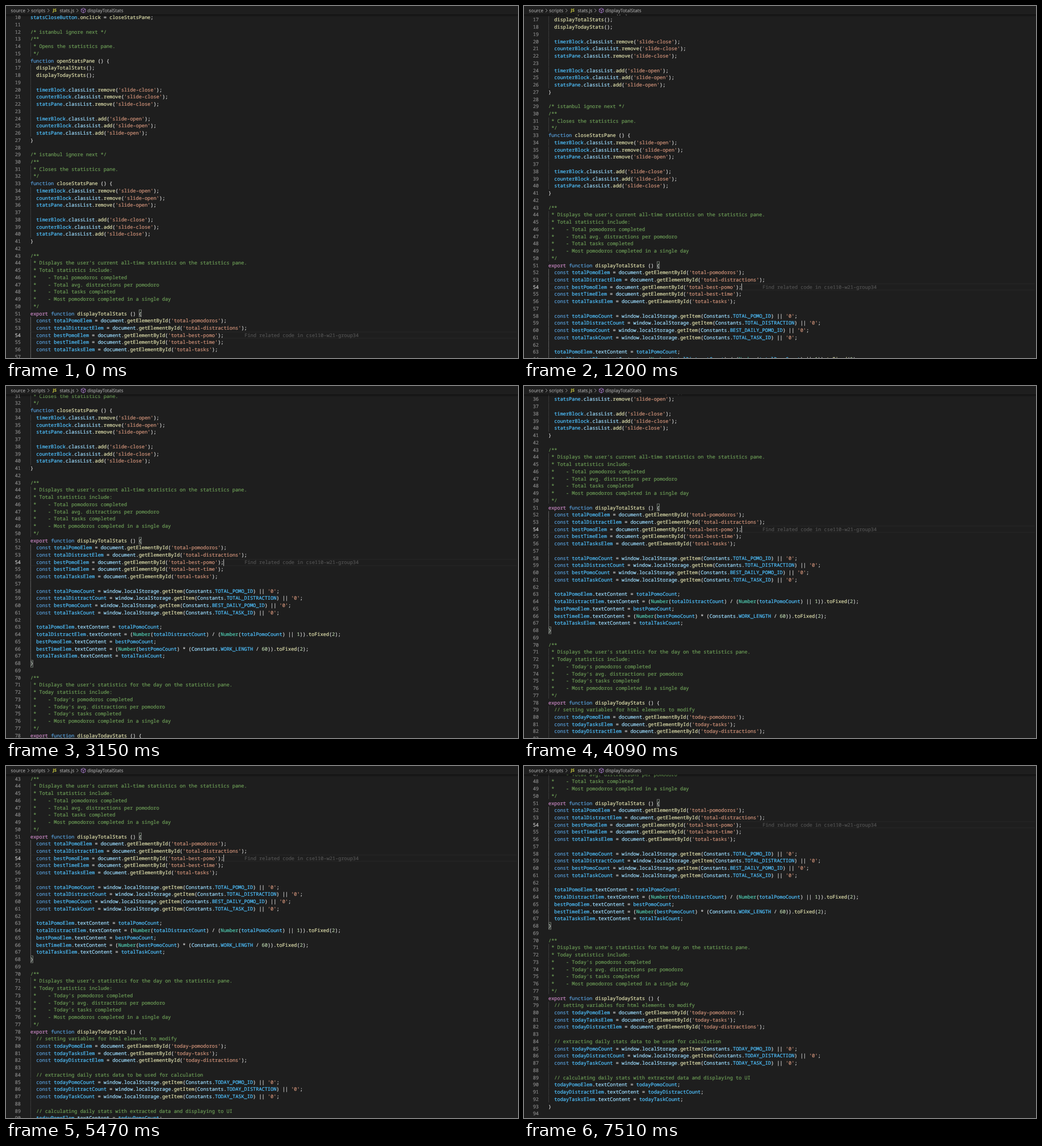
These frames come from a looping animation (902 px wide and 621 px high, 7910 ms). An HTML page:

```html
<!DOCTYPE html>
<html lang="en">
<head>
<meta charset="utf-8">
<title>stats.js</title>
<style>
  html, body { margin: 0; width: 902px; height: 621px; overflow: hidden; background: #1e1e1e; }
  body { position: relative; text-rendering: geometricPrecision; }
  #path span, #path svg, #view, #sheet, #sheet i, .row, .num, .code, .hint { position: absolute; }
  #path { font: 8.13px/15px "Open Sans", "Noto Sans", sans-serif; color: #a9a9a9; -webkit-text-stroke: .12px; }
  #path span { top: .5px; white-space: pre; }
  #path .js { font-size: 7.2px; font-weight: 700; color: #cbcb41; }
  #path svg { left: 0; top: 0; fill: none; stroke: #a9a9a9; stroke-width: .85; }
  #view { left: 0; top: 15px; width: 902px; height: 606px; overflow: hidden; }
  #view::after {
    content: ""; position: absolute; inset: 0;
    box-shadow: inset 0 4px 4px -4px #000;
  }
  #sheet {
    left: 0; top: 0; width: 902px;
    font: 8.6px/12.74px "Noto Sans Mono", monospace; color: #d4d4d4;
    -webkit-text-stroke: .22px;
  }
  .row { left: 0; width: 902px; height: 12.74px; white-space: pre; }
  .num, .code, .hint { top: .2px; }
  .num { left: 0; width: 26px; text-align: right; color: #858585; }
  .code { left: 43px; }
  .hint { left: 420.3px; color: #505050; }
  #sheet i { box-sizing: border-box; height: 12.74px; top: 0; }
  .guide { left: 43px; width: 1px; background: #3a3a3a; }
  .guide.active { background: #606060; }
  .current { left: 43px; width: 857px; border: solid #282828; border-width: 1px 0; }
  .pair { width: 5.6px; border: 1px solid #757575; background: rgba(0, 100, 0, .1); }
  #caret { left: 383px; width: 1px; background: #c4c5c3; }
  .active-num { color: #c6c6c6; }
  .comment { color: #6a9955; }
  .string { color: #ce9178; }
  .key { color: #569cd6; }
  .flow { color: #c586c0; }
  .type { color: #4ec9b0; }
  .fn { color: #dcdcaa; }
  .const { color: #4fc1ff; }
  .prop { color: #9cdcfe; }
  .digit { color: #b5cea8; }
</style>
</head>
<body>
<div id="path">
  <span style="left:8.6px">source</span>
  <span style="left:44.3px">scripts</span>
  <span class="js" style="left:82.6px">JS</span>
  <span style="left:94.4px">stats.js</span>
  <span style="left:143.2px">displayTotalStats</span>
  <svg width="220" height="15">
    <path d="M38 5l3 3-3 3M73.3 5l3 3-3 3M124.3 5l3 3-3 3"/>
    <path stroke="#b180d7" d="M136.3 3.8l3.7 1.9v4.4l-3.7 2-3.7-2V5.7zM132.6 5.7l3.7 2 3.7-2M136.3 7.7v4.4"/>
  </svg>
</div>
<div id="view"><div id="sheet"></div></div>

<script type="text/plain" id="text">
statsCloseButton.onclick = closeStatsPane;

/* istanbul ignore next */
/**
 * Opens the statistics pane.
 */
function openStatsPane () {
  displayTotalStats();
  displayTodayStats();

  timerBlock.classList.remove('slide-close');
  counterBlock.classList.remove('slide-close');
  statsPane.classList.remove('slide-close');

  timerBlock.classList.add('slide-open');
  counterBlock.classList.add('slide-open');
  statsPane.classList.add('slide-open');
}

/* istanbul ignore next */
/**
 * Closes the statistics pane.
 */
function closeStatsPane () {
  timerBlock.classList.remove('slide-open');
  counterBlock.classList.remove('slide-open');
  statsPane.classList.remove('slide-open');

  timerBlock.classList.add('slide-close');
  counterBlock.classList.add('slide-close');
  statsPane.classList.add('slide-close');
}

/**
 * Displays the user's current all-time statistics on the statistics pane.
 * Total statistics include:
 *    - Total pomodoros completed
 *    - Total avg. distractions per pomodoro
 *    - Total tasks completed
 *    - Most pomodoros completed in a single day
 */
export function displayTotalStats () {
  const totalPomoElem = document.getElementById('total-pomodoros');
  const totalDistractElem = document.getElementById('total-distractions');
  const bestPomoElem = document.getElementById('total-best-pomo');
  const bestTimeElem = document.getElementById('total-best-time');
  const totalTasksElem = document.getElementById('total-tasks');

  const totalPomoCount = window.localStorage.getItem(Constants.TOTAL_POMO_ID) || '0';
  const totalDistractCount = window.localStorage.getItem(Constants.TOTAL_DISTRACTION) || '0';
  const bestPomoCount = window.localStorage.getItem(Constants.BEST_DAILY_POMO_ID) || '0';
  const totalTaskCount = window.localStorage.getItem(Constants.TOTAL_TASK_ID) || '0';

  totalPomoElem.textContent = totalPomoCount;
  totalDistractElem.textContent = (Number(totalDistractCount) / (Number(totalPomoCount) || 1)).toFixed(2);
  bestPomoElem.textContent = bestPomoCount;
  bestTimeElem.textContent = (Number(bestPomoCount) * (Constants.WORK_LENGTH / 60)).toFixed(2);
  totalTasksElem.textContent = totalTaskCount;
}

/**
 * Displays the user's statistics for the day on the statistics pane.
 * Today statistics include:
 *    - Today's pomodoros completed
 *    - Today's avg. distractions per pomodoro
 *    - Today's tasks completed
 *    - Most pomodoros completed in a single day
 */
export function displayTodayStats () {
  // setting variables for html elements to modify
  const todayPomoElem = document.getElementById('today-pomodoros');
  const todayTasksElem = document.getElementById('today-tasks');
  const todayDistractElem = document.getElementById('today-distractions');

  // extracting daily stats data to be used for calculation
  const todayPomoCount = window.localStorage.getItem(Constants.TODAY_POMO_ID) || '0';
  const todayDistractCount = window.localStorage.getItem(Constants.TODAY_DISTRACTION) || '0';
  const todayTaskCount = window.localStorage.getItem(Constants.TODAY_TASK_ID) || '0';

  // calculating daily stats with extracted data and displaying to UI
  todayPomoElem.textContent = todayPomoCount;
  todayDistractElem.textContent = todayDistractCount;
  todayTasksElem.textContent = todayTaskCount;
}

</script>
<script>
  const FIRST = 10, CURRENT = 54, ROW = 12.74, CELL = 5.16, LEFT = 43, LOOP = 7910;
  const sheet = document.getElementById('sheet');
  const lines = document.getElementById('text').textContent.slice(1, -1).split('\n');

  const TOKEN = new RegExp([
    "(?<string>'[^']*')",
    '(?<key>\\b(?:const|function)\\b)',
    '(?<flow>\\bexport\\b)',
    '(?<type>\\bNumber\\b)',
    '(?<fn>\\b(?:onclick|closeStatsPane)\\b|\\b[a-z]\\w*(?= ?\\())',
    '(?<const>\\b[A-Z]+_[A-Z_]+|\\b(?:total|best|today|timer|counter|stats)\\w+)',
    '(?<digit>\\b\\d+)',
    '(?<prop>\\b[A-Za-z]\\w*)'
  ].join('|'), 'g');

  const wrap = (kind, text) => `<span class="${kind}">${text}</span>`;

  function highlight(line) {
    if (/^\s*(\/[*\/]|\*)/.test(line)) return wrap('comment', line);
    return line.replace(TOKEN, (text, ...rest) => {
      const groups = rest[rest.length - 1];
      return wrap(Object.keys(groups).find(k => groups[k] !== undefined), text);
    });
  }

  const indented = i => /^ /.test(lines[i] || '');
  const pairBox = col => `<i class="pair" style="left:${LEFT + col * CELL - .3}px"></i>`;

  sheet.innerHTML = lines.map((line, i) => {
    const n = FIRST + i;
    const current = n === CURRENT;
    let html = current ? '<i class="current"></i>' : '';
    if (indented(i) || (!line && indented(i - 1) && indented(i + 1))) {
      html += `<i class="guide${n > 51 && n < 68 ? ' active' : ''}"></i>`;
    }
    if (n === 51) html += pairBox(line.length - 1);
    if (n === 68) html += pairBox(0);
    html += `<span class="num${current ? ' active-num' : ''}">${n}</span>`;
    html += `<span class="code">${highlight(line)}</span>`;
    if (current) {
      html += '<span class="hint">Find related code in cse110-w21-group34</span><i id="caret"></i>';
    }
    return `<div class="row" style="top:${(i * ROW).toFixed(2)}px">${html}</div>`;
  }).join('');

  // Each leg: top of the current row at its end, and the step gaps in 10 ms.
  const legs = [
    [489.1, [12, 15, 12, 12, 15, 12, 12, 15, 15]],
    [364, [15, 12, 12, 15, 15, 12, 15, 15]],
    [246.1, [12, 15, 15, 15, 12, 15, 15, 12, 12, 15, 12, 28]],
    [191.6, [12, 15, 15, 12, 15, 15]],
    [120.6, [12, 12, 15, 15, 12, 15, 15, 12]],
    [97.1, [12, 15, 12, 12]],
    [97.1, [59, 40]]
  ];

  const steps = [{ t: 0, y: 574.1 }];
  for (const [end, gaps] of legs) {
    let { t, y } = steps[steps.length - 1];
    const dy = (end - y) / gaps.length;
    for (const gap of gaps) steps.push({ t: t += gap * 10, y: y += dy });
  }

  const caret = document.getElementById('caret');
  const viewTop = 15;
  let shown;

  function draw() {
    const now = performance.now() % LOOP;
    const step = steps.findLast(s => s.t <= now);
    if (step !== shown) {
      shown = step;
      const top = step.y - (CURRENT - FIRST) * ROW - viewTop;
      sheet.style.transform = `translateY(${top.toFixed(2)}px)`;
      const phase = step.t % 1000;
      caret.style.visibility = phase >= 10 && phase < 510 ? 'visible' : 'hidden';
    }
    requestAnimationFrame(draw);
  }
  draw();
</script>
</body>
</html>
```
